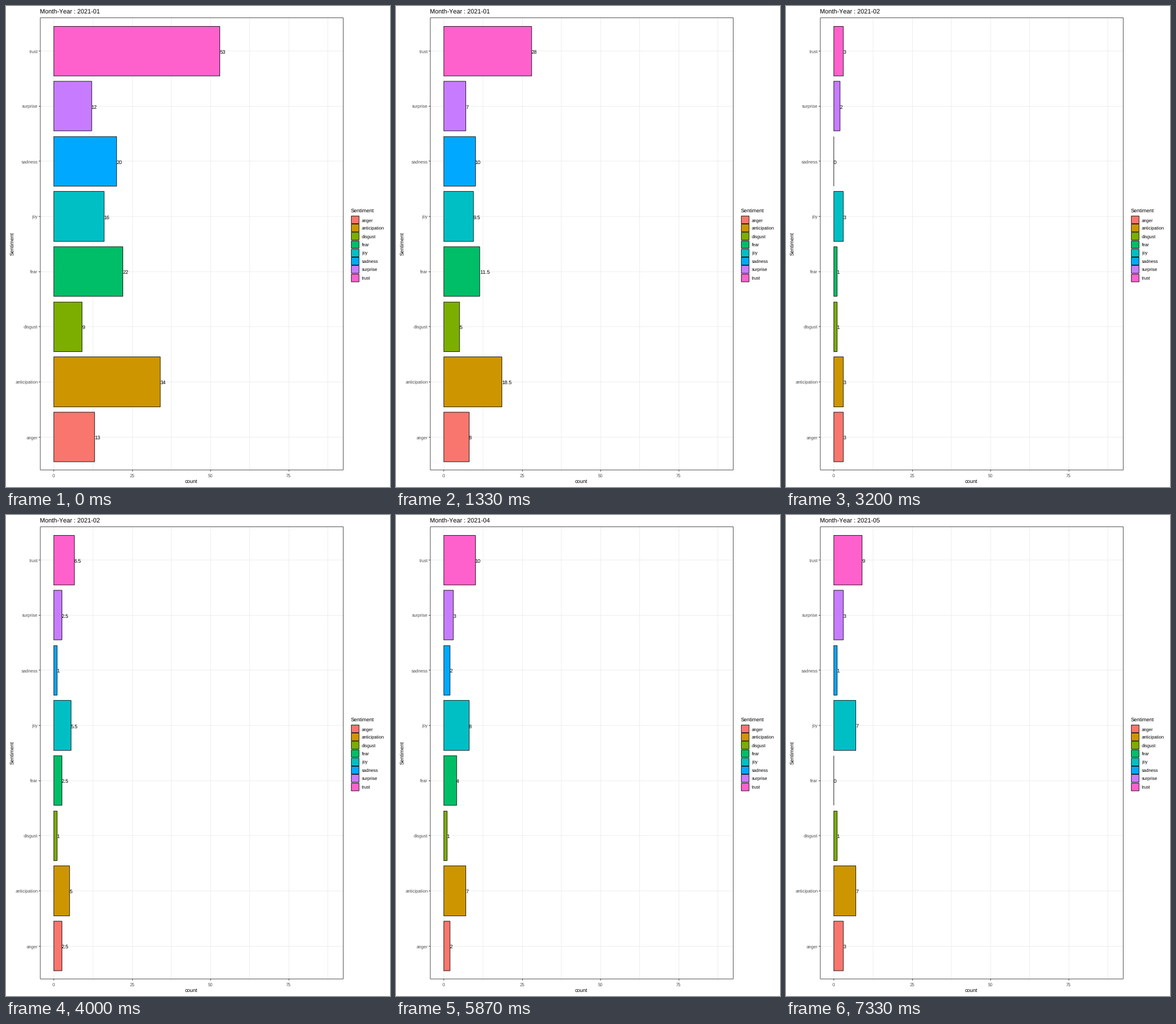
Animation, 669 px wide and 837 px high, one loop 8000 ms. Source, as a matplotlib script:

```python
from math import floor

import matplotlib.pyplot as plt
from matplotlib.animation import FuncAnimation
from matplotlib.patches import Rectangle

STAGE_W, STAGE_H, DPI = 669, 837, 64
PLOT_W, PLOT_H = 800, 1000  # layout units, scaled down to the stage
POINT = 72 / DPI            # points per stage pixel
LINE_WIDTH = POINT * STAGE_H / PLOT_H

LOOP_MS, FRAMES, STEPS, STEPS_PER_MONTH = 8000, 200, 12, 4

LEFT, TOP, RIGHT, BOTTOM = 71, 24.4, 702, 964.4
ZERO_X, UNIT_X = 99.4, 6.525
ROW_STEP = (BOTTOM - TOP) / 8.2
BAR_HEIGHT = 0.9 * ROW_STEP
KEY_LEFT, KEY_TOP, KEY_SIZE, KEY_INSET = 718.2, 435, 17.28, 0.7
TITLE_SIZE, LABEL_SIZE, TICK_SIZE = 10.7, 9, 7.75

SENTIMENTS = ["anger", "anticipation", "disgust", "fear",
              "joy", "sadness", "surprise", "trust"]
COLORS = ["#F8766D", "#CD9600", "#7CAE00", "#00BE67",
          "#00BFC4", "#00A9FF", "#C77CFF", "#FF61CC"]
MONTHS = [
    ("2021-01", [13, 34, 9, 22, 16, 20, 12, 53]),
    ("2021-02", [3, 3, 1, 1, 3, 0, 2, 3]),
    ("2021-04", [2, 7, 1, 4, 8, 2, 3, 10]),
    ("2021-05", [3, 7, 1, 0, 7, 1, 3, 9]),
]

plt.rcParams.update({
    "font.family": "Liberation Sans",
    "text.hinting": "none",
    "text.kerning_factor": 6,
})

fig = plt.figure(figsize=(STAGE_W / DPI, STAGE_H / DPI), dpi=DPI, facecolor="white")
ax = fig.add_axes([0, 0, 1, 1])
ax.set(xlim=(0, PLOT_W), ylim=(PLOT_H, 0))
ax.axis("off")


def centre(v):
    """Middle of the layout unit that v rounds to."""
    return floor(v + 0.5) + 0.5


def value_x(value):
    return ZERO_X + UNIT_X * value


def row_y(index):
    return TOP + ROW_STEP * (7.6 - index)


def line(x0, y0, x1, y1, color, z=1):
    ax.plot([centre(x0), centre(x1)], [centre(y0), centre(y1)],
            color=color, lw=LINE_WIDTH, snap=False, zorder=z)


def box(x0, y0, x1, y1, fill, edge="black", z=3):
    x0, y0, x1, y1 = map(centre, (x0, y0, x1, y1))
    rect = Rectangle((x0, y0), x1 - x0, y1 - y0, facecolor=fill, edgecolor=edge,
                     lw=LINE_WIDTH, snap=False, zorder=z)
    return ax.add_patch(rect)


def label(x, y, text, size, color="black", **kwargs):
    """Place text with its baseline at y."""
    return ax.text(x, y, text, fontsize=size * POINT, color=color,
                   va="baseline", zorder=5, **kwargs)


# Grid, panel border and axes
for i, name in enumerate(SENTIMENTS):
    y = row_y(i)
    line(LEFT, y, RIGHT, y, "#EBEBEB")
    line(LEFT - 3, y, LEFT, y, "#333333", 2)
    label(66.4, y + 4.3, name, TICK_SIZE, "#4D4D4D", ha="right")

for i in range(8):
    x = value_x(12.5 * i)
    line(x, TOP, x, BOTTOM, "#EBEBEB")
    if i % 2 == 0:
        line(x, BOTTOM, x, BOTTOM + 3, "#333333", 2)
        label(x, 979.5, str(25 * i // 2), TICK_SIZE, "#4D4D4D", ha="center")

box(LEFT, TOP, RIGHT, BOTTOM, "none", "#333333", 2)
label((LEFT + RIGHT) / 2 - 1, 992, "count", LABEL_SIZE, ha="center")
label(15.8, (TOP + BOTTOM) / 2, "Sentiment", LABEL_SIZE, ha="center",
      rotation=90, rotation_mode="anchor")

# Legend
label(KEY_LEFT, 429.3, "Sentiment", LABEL_SIZE)
for i, (name, color) in enumerate(zip(SENTIMENTS, COLORS)):
    y = KEY_TOP + KEY_SIZE * i
    box(KEY_LEFT + KEY_INSET, y + KEY_INSET,
        KEY_LEFT + KEY_SIZE - KEY_INSET, y + KEY_SIZE - KEY_INSET, color)
    label(741.2, y + KEY_SIZE / 2 + 4.3, name, TICK_SIZE)

# Animated parts
title = label(LEFT, 17, "", TITLE_SIZE)
bars, counts = [], []
for i, color in enumerate(COLORS):
    y = row_y(i)
    bars.append(box(ZERO_X, y - BAR_HEIGHT / 2, ZERO_X, y + BAR_HEIGHT / 2, color))
    counts.append(label(0, y + 5.5, "", LABEL_SIZE))


def update(frame):
    step = int((frame + 0.75) * STEPS / FRAMES)
    month = (step + 1) // STEPS_PER_MONTH
    name, values = MONTHS[month]
    if step % STEPS_PER_MONTH == 2:  # halfway to the next month
        values = [(a + b) / 2 for a, b in zip(values, MONTHS[month + 1][1])]
    title.set_text(f"Month-Year : {name}")
    for bar, count, value in zip(bars, counts, values):
        x = value_x(value)
        bar.set_width(centre(x) - centre(ZERO_X))
        count.set_x(x)
        count.set_text(f"{value:g}")
    return [title, *bars, *counts]


anim = FuncAnimation(fig, update, frames=FRAMES, interval=LOOP_MS // FRAMES,
                     repeat=True, repeat_delay=0, blit=False)
plt.show()
```
